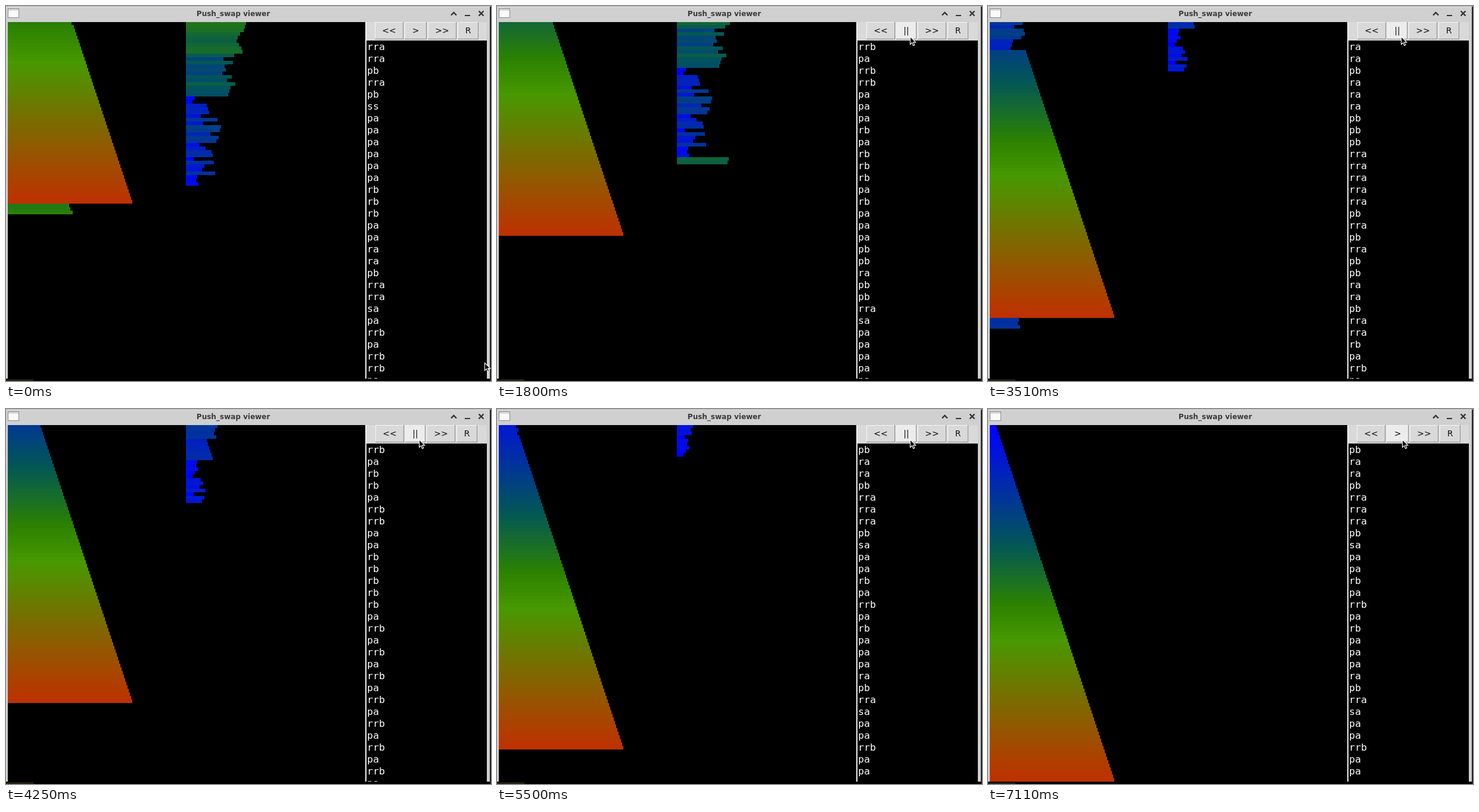
Recreate the animation shown at these times as an HTML page with a canvas. Size 814 by 630 pixels, loop 7150 ms.

```html
<!DOCTYPE html>
<html lang="en">
<head>
<meta charset="utf-8">
<title>Push_swap viewer</title>
<style>
html, body { margin: 0; width: 100%; height: 100%; overflow: hidden; background: #000; }
canvas { display: block; }
</style>
</head>
<body>
<canvas id="stage" width="814" height="630"></canvas>
<script>
const ctx = document.getElementById('stage').getContext('2d');
const LOOP = 7150, COUNT = 100, ROWS = 28;

// Instructions; a trailing digit repeats the one before it.
const OPS = `
  rra2 pb rra pb ss pa6 rb3 pa2 ra2 pb rra2 sa pa
  rrb pa rrb2 pa3 rb pa rb3 pa rb pa3 pb2 ra pb2 rra sa pa5 rrb pa rrb2 pa
  rrb pa rrb pa2 rb2 pa3 rb pa rb pa5 rb2 pa2 rb pa rb2 pa ra2 pb2
  ra2 pb ra3 pb3 rra5 pb rra pb rra pb2 ra2 pb rra2 rb pa rrb pa
  rb2 pa rrb2 pa2 rb5 pa rrb pa rrb pa rrb pa rrb pa rrb pa rrb pa
  rrb pa rrb2 pa rrb pa rrb pa rrb pa pb ra pb ra2 pb rra3 pb sa pa2
  rb pa rrb pa rb pa3 ra pb rra sa pa2 rrb pa2`
  .trim().split(/\s+/)
  .flatMap(s => Array(+(s.match(/\d/) || 1)).fill(s.replace(/\d/, '')));

const INVERSE = { pa: 'pb', pb: 'pa', ra: 'rra', rra: 'ra', rb: 'rrb', rrb: 'rb', sa: 'sa', ss: 'ss' };

const swap = s => [s[0], s[1]] = [s[1], s[0]];
const MOVES = {
  pa: (a, b) => a.unshift(b.shift()),
  pb: (a, b) => b.unshift(a.shift()),
  ra: a => a.push(a.shift()),
  rb: (a, b) => b.push(b.shift()),
  rra: a => a.unshift(a.pop()),
  rrb: (a, b) => b.unshift(b.pop()),
  sa: a => swap(a),
  ss: (a, b) => { swap(a); swap(b); }
};

// Work back from the sorted stack to get the state before every instruction.
const states = [];
{
  const a = Array.from({ length: COUNT }, (_, i) => i), b = [];
  states[OPS.length] = [a.slice(), b.slice()];
  for (let i = OPS.length - 1; i >= 0; i--) {
    MOVES[INVERSE[OPS[i]]](a, b);
    states[i] = [a.slice(), b.slice()];
  }
}

// Piecewise linear lookup: knots are [x, value...]
function lerp(knots, x) {
  if (x <= knots[0][0]) return knots[0].slice(1);
  for (let i = 1; i < knots.length; i++) {
    const p = knots[i - 1], q = knots[i];
    if (x <= q[0]) {
      const k = (x - p[0]) / (q[0] - p[0]);
      return p.slice(1).map((v, j) => v + (q[j + 1] - v) * k);
    }
  }
  return knots[knots.length - 1].slice(1);
}

const PACE = [[1130, 0], [1800, 25.7], [2680, 60.2], [3510, 90.7], [4990, 144.7], [6040, 184]];
const HUES = [[0, 0, 0, 255], [33, 2, 86, 87], [50, 44, 130, 0], [60, 72, 152, 0], [99, 190, 49, 0]];
const colors = Array.from({ length: COUNT }, (_, v) => `rgb(${lerp(HUES, v).map(Math.round)})`);

function rect(x, y, w, h, color) {
  ctx.fillStyle = color;
  ctx.fillRect(x, y, w, h);
}

function label(text, x, y, font, color, align) {
  ctx.font = font;
  ctx.fillStyle = color;
  ctx.textAlign = align;
  ctx.fillText(text, x, y);
}

function line(points, width, color) {
  ctx.beginPath();
  points.forEach(([x, y]) => ctx.lineTo(x, y));
  ctx.lineWidth = width;
  ctx.strokeStyle = color;
  ctx.stroke();
}

function clipTo(x, y, w, h, paint) {
  ctx.save();
  ctx.beginPath();
  ctx.rect(x, y, w, h);
  ctx.clip();
  paint();
  ctx.restore();
}

function drawBars(stack, x) {
  stack.forEach((v, i) => rect(x, 26 + 6 * i, 11 + 2 * v, 6, colors[v]));
}

function drawFrame() {
  rect(0, 0, 814, 630, '#000');
  rect(0, 0, 812, 626, '#d0d0d0');
  rect(0, 0, 814, 1, '#b2b2b2');
  rect(0, 1, 812, 1, '#e2e2e2');
  rect(812, 1, 2, 629, '#222');
  rect(0, 627, 46, 3, '#222010');
  rect(3, 27, 600, 599, '#000');
  rect(603, 27, 2, 599, '#f0f0f0');
  rect(605, 27, 202, 31, '#d9d9d9');
  rect(605, 58, 202, 568, '#000');

  rect(3, 4, 19, 16, '#8c8c8c');
  rect(4, 5, 17, 14, '#fafafa');
  rect(4, 5, 17, 3, '#dadada');

  label('Push_swap viewer', 381.5, 17, 'bold 12px "DejaVu Sans", sans-serif', '#3a3a3a', 'center');
  const ink = '#333';
  line([[747, 15.5], [751.5, 11], [756, 15.5]], 2.4, ink);
  rect(770, 15, 9, 2, ink);
  line([[793.5, 8.5], [801.5, 16.5]], 2.4, ink);
  line([[801.5, 8.5], [793.5, 16.5]], 2.4, ink);
}

function drawButton(text, x, w, hover) {
  rect(x, 27, w, 29, '#8e8e8e');
  rect(x, 27, w - 1, 28, '#f6f6f6');
  rect(x + 1, 28, w - 2, 27, hover ? '#ececec' : '#d9d9d9');
  label(text, x + w / 2, 46, '14px "DejaVu Sans", sans-serif', '#111', 'center');
}

function drawButtons(running, hover) {
  const set = running
    ? [['<<', 620, 48], ['||', 670, 34], ['>>', 706, 48], ['R', 756, 35]]
    : [['<<', 619, 48], ['>', 669, 37], ['>>', 708, 48], ['R', 758, 35]];
  set.forEach(([text, x, w], i) => drawButton(text, x, w, hover && i === 1));
}

// The list scrolls a little after the bars have moved.
function drawList(pos) {
  const top = Math.min(Math.max(Math.floor(pos - 1.5), 0), OPS.length - ROWS);
  OPS.slice(top, top + ROWS + 1).forEach((op, i) =>
    label(op, 606, 74 + 20 * i, '16.6px "DejaVu Sans Mono", monospace', '#fff', 'left'));
}

function drawPointer(x, y) {
  const shape = [[0, 0], [0, 13], [3, 10.2], [5.2, 15], [7.4, 14], [5.2, 9.4], [9.3, 9.4]];
  ctx.beginPath();
  shape.forEach(([dx, dy]) => ctx.lineTo(x + dx + 0.5, y + dy + 0.5));
  ctx.closePath();
  ctx.fillStyle = '#000';
  ctx.fill();
  ctx.lineWidth = 1.1;
  ctx.strokeStyle = '#fff';
  ctx.stroke();
}

function pointerAt(t) {
  if (t >= 6700) return [lerp([[6700, 693], [7000, 695]], t)[0], 51];
  const k = Math.min(Math.max((t - 50) / 850, 0), 1);
  const e = k * k * (3 - 2 * k);
  return [803 - 110 * e, 599 - 548 * e];
}

function draw(t) {
  const [pos] = lerp(PACE, t);
  const [a, b] = states[Math.floor(pos)];
  const [px, py] = pointerAt(t);
  drawFrame();
  clipTo(3, 27, 600, 599, () => {
    drawBars(a, 3);
    drawBars(b, 302);
  });
  drawButtons(t >= 1110 && t < 6085, py < 56);
  clipTo(605, 58, 202, 568, () => drawList(pos));
  drawPointer(px, py);
}

const start = performance.now();
function tick() {
  draw((performance.now() - start) % LOOP);
  requestAnimationFrame(tick);
}
tick();
</script>
</body>
</html>
```
